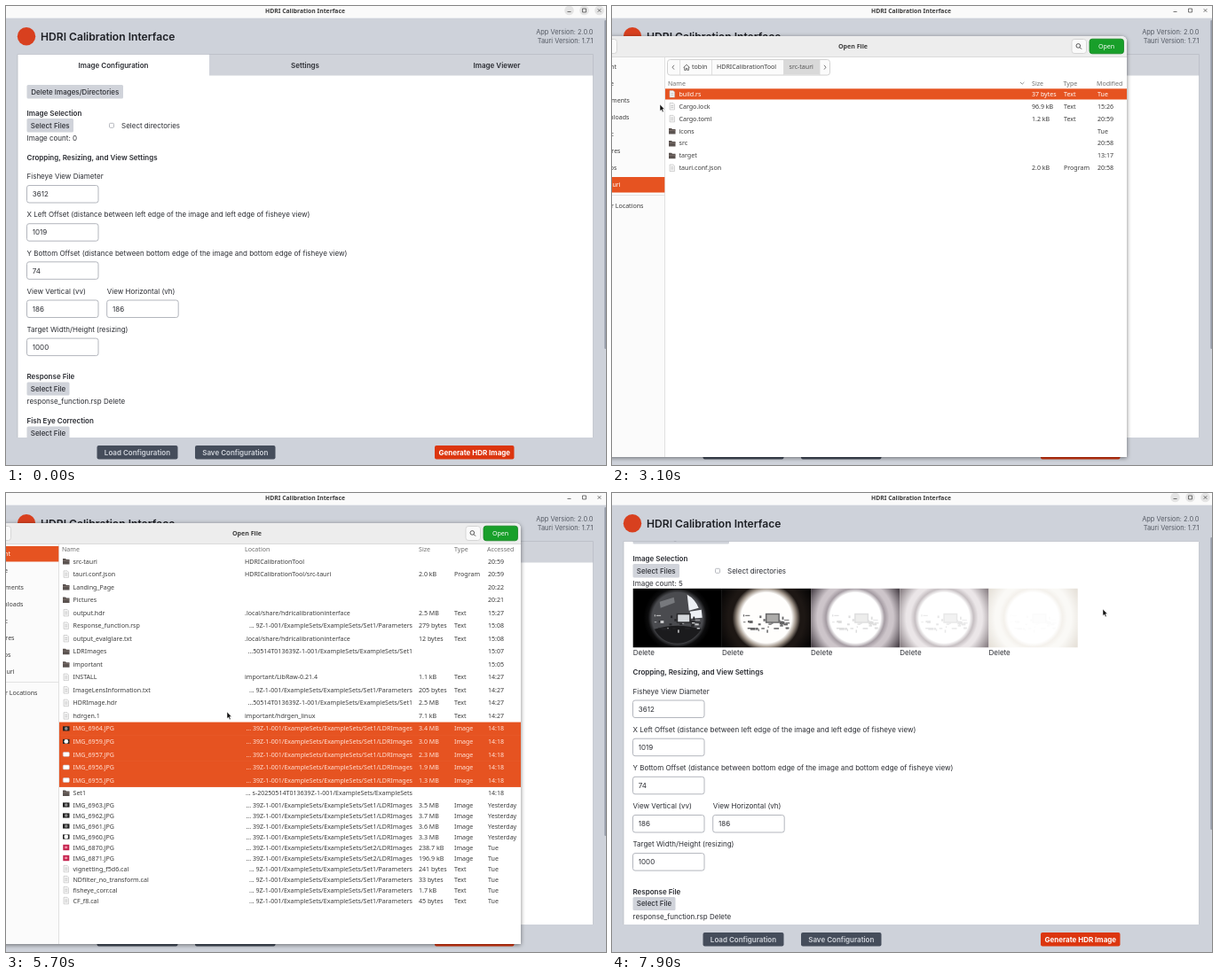
Write an HTML page that moves like this. It is 676 px wide and 518 px high and loops after 8000 ms.

```html
<!DOCTYPE html>
<html lang="en">
<head>
<meta charset="utf-8">
<title>HDRI Calibration Interface</title>
<style>
html, body { margin: 0; width: 100%; height: 100%; overflow: hidden; background: #ced2da; }
svg { display: block; width: 676px; height: 518px; }
text { white-space: pre; }
.app { font: 8px Inter, sans-serif; fill: #2b2d33; }
.gtk { font: 7.07px "Noto Sans", sans-serif; fill: #3c3c3c; }
.b { font-weight: 600; }
.bb { font-weight: 700; }
</style>
</head>
<body>
<svg id="stage" viewBox="0 0 676 518"></svg>
<script>
const ORANGE = '#e65321', GREY = '#d0d3da';

const text = (x, y, s, attrs = '') => `<text x="${x}" y="${y}" ${attrs}>${s}</text>`;
const mid = 'text-anchor="middle"', end = 'text-anchor="end"', bold = 'class="b"';
const rect = (x, y, w, h, fill, attrs = '') =>
  `<rect x="${x}" y="${y}" width="${w}" height="${h}" fill="${fill}" ${attrs}/>`;
const path = (d, stroke, attrs = '') => `<path d="${d}" fill="none" stroke="${stroke}" ${attrs}/>`;
const group = (id, body, attrs = '') => `<g id="${id}" ${attrs}>${body}</g>`;

// ---- main window ----
const button = (x, y, w, h, label, id = '') =>
  rect(x, y, w, h, GREY, `rx="1.5" id="${id}"`) + text(x + w / 2, y + h / 2 + 2.9, label, mid + ' font-weight="500"');
const field = (x, y, label, value) =>
  text(x, y, label) +
  rect(x, y + 7.3, 80.5, 19.5, '#fff', 'rx="2.5" stroke="#b3b6bd" stroke-width="1"') +
  text(x + 6.3, y + 20, value);

// corner, halo, rim, centre, furniture strength
const exposures = [
  ['#000', '#000', '#0c0c0d', '#4a4b4f', 1],
  ['#050404', '#1d1714', '#a1968b', '#fffefc', .7],
  ['#4d454c', '#cdc5ca', '#a59ca3', '#fff', .15],
  ['#8b8286', '#ebe6e8', '#c6bfc2', '#fff', .1],
  ['#e6e1d9', '#faf9f6', '#f4f1ec', '#fff', .01]
];
const stop = (at, color) => `<stop offset="${at}" stop-color="${color}"/>`;
const gradients = exposures.map(([corner, halo, rim, centre], i) =>
  `<radialGradient id="lens${i}" gradientUnits="userSpaceOnUse" cx="50" cy="33" r="58">` +
  stop(.49, centre) + stop(.57, rim) + stop(.66, halo) + stop(.74, halo) + stop(1, corner) + '</radialGradient>').join('');

let seed = 11;
const random = () => (seed = seed * 16807 % 2147483647) / 2147483647;
const clutter = Array.from({ length: 34 }, () => {
  const x = 24 + 48 * random(), y = 29 + 19 * random();
  return [x, y, 1 + 5 * random(), .8 + 2.6 * random()];
});
const blocks = (list, fill) => list.map(b => rect(...b, fill)).join('');
const office = (dim) =>
  (dim ? '' :
    '<path d="M24 46Q50 38 77 46 66 62 50 62 33 62 24 46z" fill="#1b1b1d"/>' +
    '<path d="M61 7q9 5 13 15l-11 3zM64 26l13 -2 1 9 -13 1z" fill="#eef1f5"/>' +
    '<path d="M30 15l16 -5 1 6 -16 6z" fill="#77797d"/>') +
  blocks(clutter, '#232326') + (dim ? '' : blocks(clutter.filter((_, i) => i % 3 === 0), '#c9cacc')) +
  rect(49, 28, 16, 11, '#2b2b2d') + rect(50.5, 29.5, 13, 8, dim ? '#8b8a88' : '#d5d8dc');
const thumbs = exposures.map((e, i) =>
  `<g transform="translate(${23.7 + i * 100.2} 154.8)">` + rect(0, 0, 100.2, 66.5, `url(#lens${i})`) +
  `<g opacity="${e[4]}">${office(i)}</g>` + text(0, 75.3, 'Delete') + '</g>').join('');

const settings =
  text(23.5, 173.6, 'Cropping, Resizing, and View Settings', bold) +
  field(23.5, 195.2, 'Fisheye View Diameter', '3612') +
  field(23.5, 238.4, 'X Left Offset (distance between left edge of the image and left edge of fisheye view)', '1019') +
  field(23.5, 281.5, 'Y Bottom Offset (distance between bottom edge of the image and bottom edge of fisheye view)', '74') +
  field(23.5, 324.7, 'View Vertical (vv)', '186') +
  field(113.7, 324.7, 'View Horizontal (vh)', '186') +
  field(23.5, 367.8, 'Target Width/Height (resizing)', '1000') +
  text(23.5, 421, 'Response File', bold) + button(23.5, 424.5, 48, 15, 'Select File') +
  text(23.5, 449.2, 'response_function.rsp Delete') +
  text(23.5, 471, 'Fish Eye Correction', bold) + button(23.5, 474.5, 48, 15, 'Select File');

const content =
  rect(13, 54, 649, 700, '#fff') + rect(229, 54, 433, 24.5, GREY) +
  ['Image Configuration', 'Settings', 'Image Viewer'].map((s, i) => text(121 + i * 216, 69.6, s, mid + bold)).join('') +
  button(23.5, 89, 108.5, 15.5, 'Delete Images/Directories') +
  text(23.5, 123.5, 'Image Selection', bold) +
  button(23.5, 127, 52.5, 15.5, 'Select Files', 'pick') +
  rect(116.5, 132.3, 5, 5, '#fff', 'rx="1" stroke="#a5a8af" stroke-width=".8"') +
  text(130, 137.6, 'Select directories') +
  text(23.5, 151.6, 'Image count: 0', 'id="count"') +
  group('thumbs', thumbs) + group('settings', settings);

const action = (x, w, label, fill, color, cls) =>
  rect(x, 496, w, 15.5, fill, 'rx="2"') + text(x + w / 2, 506.8, label, `${mid} class="${cls}" fill="${color}"`);

const app =
  rect(0, 0, 676, 518, '#ced2da') + rect(0, 0, 676, 13.7, '#fafafa') +
  text(337, 7.6, 'HDRI Calibration Interface', mid + ' class="gtk bb" style="font-size:6.8px;font-weight:700"') +
  group('knobs', [634.5, 651.5, 668.5].map(x => `<circle cx="${x}" cy="5" r="5.3" fill="#e4e4e4"/>`).join('')) +
  path('M632.5 6.5h4M649.5 3h4v4h-4zM666.7 3.2l3.6 3.6m0 -3.6l-3.6 3.6', '#555', 'stroke-width=".8"') +
  '<circle cx="23" cy="34.3" r="10.2" fill="#d8401f"/>' +
  text(39, 38.6, 'HDRI Calibration Interface', bold + ' font-size="12.1" fill="#1d1f24"') +
  text(661.5, 32.3, 'App Version: 2.0.0', end + ' font-size="7.4" fill="#555a64"') +
  text(661.5, 42, 'Tauri Version: 1.7.1', end + ' font-size="7.4" fill="#555a64"') +
  `<g clip-path="url(#panel)">${group('content', content)}</g>` +
  path('M13 487V54.5H661.5V487', '#b9bdc6', 'stroke-width=".8"') +
  action(102.5, 91, 'Load Configuration', '#454d5b', '#d0d4db', 'b') +
  action(213, 90.5, 'Save Configuration', '#454d5b', '#d0d4db', 'b') +
  action(483, 89.5, 'Generate HDR Image', '#dc360f', '#fff', 'bb') +
  rect(674.3, 16, 2, 371, '#979ca8', 'rx="1" id="bar"');

// ---- file dialog ----
const icons = {
  d: '<path d="M0 -3h3l1 1h3.5v5.5h-7.5z" fill="#5b5350"/><path d="M0 -.8h7.5v.6h-7.5z" fill="#8c7d78"/>',
  f: '<path d="M1 -3.7h4l1.5 1.5v6h-5.5z" fill="#f4f4f4" stroke="#bdbdbd" stroke-width=".6"/><path d="M2.3 -.8h3M2.3 1.2h3" stroke="#aaa" stroke-width=".6"/>',
  k: rect(0, -2.6, 7.5, 5.2, '#222') + '<circle cx="3.8" r="1.8" fill="#8d8d8d"/>',
  o: rect(0, -2.6, 7.5, 5.2, '#222') + '<circle cx="3.8" r="2.4" fill="#fff"/>',
  w: rect(.3, -2.4, 7, 4.8, '#fff', 'rx="1" stroke="#c9c6d2" stroke-width=".6"'),
  p: rect(.3, -3.2, 7, 6.4, '#c4234f') + rect(2.2, -1.4, 3, 2.6, '#ef8fa4')
};
const icon = (x, y, k) => `<g transform="translate(${x} ${y})">${icons[k]}</g>`;

const sourceRows = `f|build.rs|37 bytes|Text|Tue
f|Cargo.lock|96.9 kB|Text|15:26
f|Cargo.toml|1.2 kB|Text|20:59
d|icons|||Tue
d|src|||20:58
d|target|||13:17
f|tauri.conf.json|2.0 kB|Program|20:58`.split('\n').map((line, i) => {
  const [kind, name, size, type, when] = line.split('|'), y = 99.3 + i * 13.9;
  return (i ? '' : rect(60, 93.3, 520, 12.2, ORANGE)) + `<g ${i ? '' : 'fill="#fff"'}>` + icon(64, y, kind) +
    text(75.5, y + 2.5, name) + text(473, y + 2.5, size) + text(509, y + 2.5, type) + text(547, y + 2.5, when) + '</g>';
}).join('');

// In locations: ~ full example path, @ and % image folders, # parameter folder, $ set folder
const expand = s => s
  .replace('@', '... 39Z-1-001/~/Set1/LDRImages').replace('%', '... 39Z-1-001/~/Set2/LDRImages')
  .replace('#', '... 9Z-1-001/~/Set1/Parameters').replace('$', '...50514T013639Z-1-001/~/Set1')
  .replace('~', 'ExampleSets/ExampleSets');
const recentRows = `d|src-tauri|HDRICalibrationTool|||20:59
f|tauri.conf.json|HDRICalibrationTool/src-tauri|2.0 kB|Program|20:59
d|Landing_Page||||20:22
d|Pictures||||20:21
f|output.hdr|.local/share/hdricalibrationinterface|2.5 MB|Text|15:27
f|Response_function.rsp|#|279 bytes|Text|15:08
f|output_evalglare.txt|.local/share/hdricalibrationinterface|12 bytes|Text|15:08
d|LDRImages|$|||15:07
d|important||||15:05
f|INSTALL|important/LibRaw-0.21.4|1.1 kB|Text|14:27
f|ImageLensInformation.txt|#|205 bytes|Text|14:27
f|HDRImage.hdr|$|2.5 MB|Text|14:27
f|hdrgen.1|important/hdrgen_linux|7.1 kB|Text|14:27
k|IMG_6964.JPG|@|3.4 MB|Image|14:18
o|IMG_6959.JPG|@|3.0 MB|Image|14:18
w|IMG_6957.JPG|@|2.3 MB|Image|14:18
w|IMG_6956.JPG|@|1.9 MB|Image|14:18
w|IMG_6955.JPG|@|1.3 MB|Image|14:18
d|Set1|... s-20250514T013639Z-1-001/~|||14:18
k|IMG_6963.JPG|@|3.5 MB|Image|Yesterday
k|IMG_6962.JPG|@|3.7 MB|Image|Yesterday
k|IMG_6961.JPG|@|3.6 MB|Image|Yesterday
o|IMG_6960.JPG|@|3.3 MB|Image|Yesterday
p|IMG_6870.JPG|%|238.7 kB|Image|Tue
p|IMG_6871.JPG|%|196.9 kB|Image|Tue
f|vignetting_f5d6.cal|#|241 bytes|Text|Tue
f|NDfilter_no_transform.cal|#|33 bytes|Text|Tue
f|fisheye_corr.cal|#|1.7 kB|Text|Tue
f|CF_f8.cal|#|45 bytes|Text|Tue`.split('\n').map((line, i) => {
  const [kind, name, place, size, type, when] = line.split('|');
  const y = i < 19 ? 77 + i * 14.53 : 352 + (i - 19) * 12, base = y + 2.6;
  const full = expand(place), cut = full.startsWith('...');
  return group('row' + i, rect(60, y - 7.3, 520, 15.2, ORANGE, 'class="mark" visibility="hidden"') +
    icon(64, y, kind) + text(75.5, base, name) + text(cut ? 458 : 269, base, full, cut ? end : '') +
    text(465, base, size) + text(505, base, type) + text(543, base, when));
}).join('');

const heads = (y, cols) => `<g fill="#6f6f6f" font-weight="500">` + cols.map(([x, s]) => text(x, y, s)).join('') + '</g>';
const places = [[5, 'Recent'], [2, 'Home'], [20, 'Documents'], [19.5, 'Downloads'], [2, 'Music'], [9.5, 'Pictures'], [5.5, 'Videos'], [9.5, 'src-tauri']];
const crumbs =
  rect(62.5, 60.5, 183, 17.5, '#fbfbfb', 'rx="3" stroke="#d2d2d2"') + rect(193.5, 61, 40.5, 16.5, '#d9d9d9') +
  path('M76.5 61v17M112.5 61v17M193.5 61v17M234 61v17', '#d8d8d8', 'stroke-width=".8"') +
  path('M70 66.8l-2 2.4 2 2.4M239 66.8l2 2.4 -2 2.4M80.5 69.5l3.5 -3.3 3.5 3.3M81.7 68.8v3.6h1.6v-2h1.5v2h1.6v-3.6', '#555', 'stroke-width=".8"') +
  text(90, 71.4, 'tobin') + text(118, 71.4, 'HDRICalibrationTool') + text(199.5, 71.4, 'src-tauri', 'fill="#555"');

const dialog =
  '<path d="M-20 34H573q7 0 7 7V509H-20z" fill="#fff" filter="url(#shadow)"/>' +
  '<path d="M-20 34H573q7 0 7 7V57.5H-20z" fill="#ededed"/>' + path('M0 57.5H580', '#d5d5d5', 'stroke-width=".8"') +
  rect(0, 58, 59.5, 451, '#fbfbfb') + path('M59.5 58V509', '#dadada', 'stroke-width=".8"') +
  rect(-20, 37.5, 25.5, 16, '#fafafa', 'rx="3" stroke="#cfcfcf" stroke-width=".8"') +
  rect(518, 37.5, 16.5, 16, '#fafafa', 'rx="3" stroke="#cfcfcf" stroke-width=".8"') +
  '<circle cx="525.3" cy="44.9" r="2.3" fill="none" stroke="#444" stroke-width=".9"/>' + path('M527 46.6l2 2', '#444') +
  text(271.5, 48, 'Open File', mid + ' class="bb"') +
  rect(538, 37.2, 38.5, 16.6, '#189f2a', 'rx="3" id="open" stroke-width=".8"') + text(557, 48, 'Open', mid + ' id="openLabel"') +
  rect(0, 60, 59.3, 17.5, ORANGE, 'id="here"') +
  places.map(([x, s], i) => text(x, 71.2 + i * 18.95, s, `${end} class="place"`)).join('') +
  path('M0 213.5H59', '#dedede', 'stroke-width=".8"') + text(35.5, 227.6, 'Other Locations', end) +
  group('source', crumbs + heads(89.6, [[63, 'Name'], [473, 'Size'], [508.5, 'Type'], [546, 'Modified']]) +
    path('M460 86l2.2 2.2 2.2 -2.2', '#777', 'stroke-width=".8"') + sourceRows) +
  group('recent', heads(66.2, [[63, 'Name'], [269, 'Location'], [465, 'Size'], [505, 'Type'], [542, 'Accessed']]) + recentRows);

document.getElementById('stage').innerHTML =
  `<defs>${gradients}<clipPath id="panel">${rect(13, 54, 649, 433, '#fff')}</clipPath>` +
  '<filter id="shadow" x="-10%" y="-10%" width="120%" height="120%"><feDropShadow dx="0" dy="1" stdDeviation="2.5" flood-opacity=".5"/></filter></defs>' +
  group('app', app, 'class="app"') + group('dialog', dialog, 'class="gtk"') +
  group('cursor', '<path d="M0 0V7.6L1.7 6.1 2.9 8.8 4.2 8.2 3 5.6H5.2z" fill="#111" stroke="#fff" stroke-width=".5"/>');

// ---- motion ----
const $ = id => document.getElementById(id);
const set = (el, name, value) => el.setAttribute(name, value);
const show = (id, on) => { $(id).style.display = on ? '' : 'none'; };
const ease = u => u * u * (3 - 2 * u);
const clamp = u => Math.max(0, Math.min(1, u));

// time, x, y of the pointer tip
const route = [
  [1400, 250, 300], [1900, 128.5, 157], [2200, 55, 134], [2700, 55, 134], [3100, 54, 111],
  [3400, 14, 68], [3750, 14, 68], [4600, 96, 294], [4750, 97, 322], [4950, 97, 322],
  [5200, 100, 265], [5350, 100, 265], [5700, 249, 247], [6150, 562, 43], [6400, 565, 42],
  [6600, 565, 42], [7100, 553, 131]
];
function pointer(t) {
  const i = route.findIndex(p => p[0] > t);
  if (i < 0) return route[route.length - 1].slice(1);
  const [a, b] = [route[Math.max(0, i - 1)], route[i]];
  const u = ease(clamp((t - a[0]) / (b[0] - a[0])));
  return [1, 2].map(k => a[k] + (b[k] - a[k]) * u);
}

const placeEls = [...document.querySelectorAll('.place')];
function draw(t) {
  const open = t >= 2600 && t < 6400, recent = t >= 3600, loaded = t >= 7100;
  const first = t >= 5300 ? 13 : t >= 4850 ? 17 : 18;

  show('dialog', open);
  show('knobs', !open);
  show('source', !recent);
  show('recent', recent);
  set($('here'), 'y', recent ? 60 : 193);
  placeEls.forEach((el, i) => set(el, 'fill', i === (recent ? 0 : 7) ? '#fff' : '#3c3c3c'));
  for (let i = 13; i < 18; i++) {
    set($('row' + i), 'fill', i >= first ? '#ffe3d8' : '#3c3c3c');
    set($('row' + i).querySelector('.mark'), 'visibility', i >= first ? 'inherit' : 'hidden');
  }
  const ready = !recent || first < 18;
  set($('open'), 'fill', ready ? '#189f2a' : '#f3f3f3');
  set($('open'), 'stroke', ready ? '#128420' : '#d3d3d3');
  set($('openLabel'), 'fill', ready ? '#fff' : '#a5a5a5');

  set($('pick'), 'fill', t >= 2150 && t < 6650 ? '#9a9fab' : GREY);
  $('count').textContent = `Image count: ${loaded ? 5 : 0}`;
  show('thumbs', loaded);
  set($('settings'), 'transform', `translate(0 ${loaded ? 78.5 : 0})`);
  const scroll = ease(clamp((t - 7400) / 300));
  set($('content'), 'transform', `translate(0 ${-47 * scroll})`);
  set($('bar'), 'y', 16 + 34 * scroll);
  set($('bar'), 'height', loaded ? 330 : 371);

  show('cursor', t >= 1400);
  set($('cursor'), 'transform', `translate(${pointer(t)})`);
}

const start = performance.now();
function tick() {
  draw((performance.now() - start) % 8000);
  requestAnimationFrame(tick);
}
tick();
</script>
</body>
</html>
```
